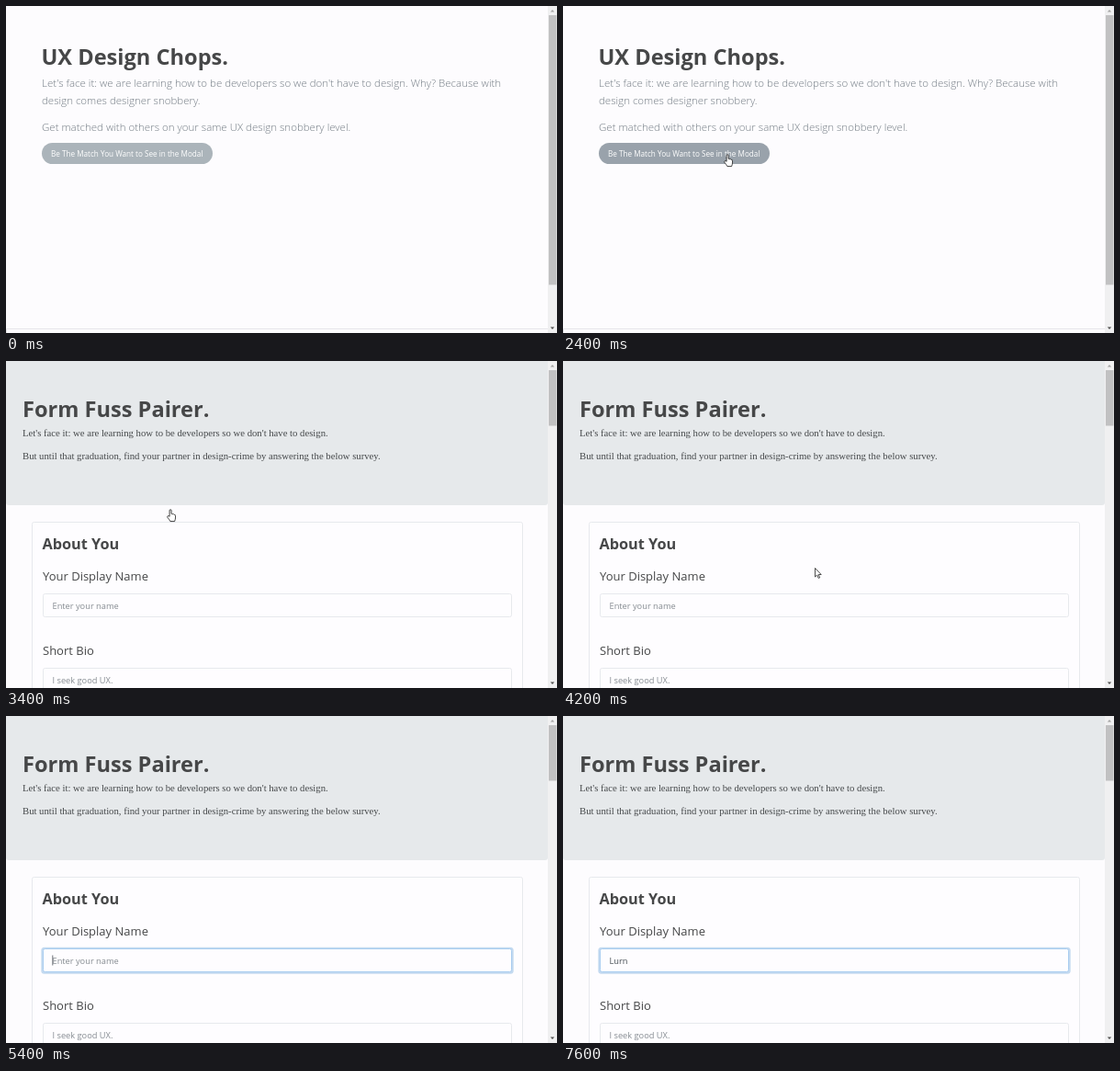
These frames come from a looping animation (600 px wide and 356 px high, 8 s). An HTML page:

```html
<!DOCTYPE html>
<html lang="en">
<head>
<meta charset="utf-8">
<title>Survey walkthrough</title>
<style>
  html, body { margin: 0; width: 100%; height: 100%; overflow: hidden; background: #fdfcfe; }
  svg { display: block; width: 600px; height: 356px; }
  text { font-family: "Open Sans", "Noto Sans", sans-serif; fill: #464748; white-space: pre; }
  .title { font-size: 23.6px; font-weight: 700; }
  .lead { font-size: 11.5px; font-weight: 300; fill: #717a82; }
  .button { font-size: 8.16px; fill: #fff; }
  .intro { font: 10.7px "Liberation Serif", serif; fill: #46494b; }
  .section { font-size: 16.3px; font-weight: 700; }
  .label { font-size: 13px; }
  .field { font-size: 9.25px; fill: #868c92; }
  .typed { fill: #495057; }
  .box { fill: #fefdff; stroke: #e7e9ed; }
</style>
</head>
<body>
<svg viewBox="0 0 600 356">
  <rect width="600" height="356" fill="#fdfcfe"/>

  <g id="landing">
    <path d="M0.5 356V351.5H590" fill="none" stroke="#e6e6ea"/>
    <text class="title" x="38.5" y="64">UX Design Chops.</text>
    <text class="lead" x="39" y="87.5">Let's face it: we are learning how to be developers so we don't have to design. Why? Because with</text>
    <text class="lead" x="39" y="106.5">design comes designer snobbery.</text>
    <text class="lead" x="39" y="135.5">Get matched with others on your same UX design snobbery level.</text>
    <rect id="ring" x="37.8" y="147.8" width="188.4" height="25.4" rx="12.7" fill="#c5cace"/>
    <rect id="button" x="39" y="149" width="186" height="23" rx="11.5"/>
    <text class="button" x="49" y="163.7">Be The Match You Want to See in the Modal</text>
  </g>

  <g id="survey">
    <rect y="-4" width="590" height="161" rx="3" fill="#e6e9eb"/>
    <text class="title" x="18" y="61">Form Fuss Pairer.</text>
    <text class="intro" x="18" y="81.5">Let's face it: we are learning how to be developers so we don't have to design.</text>
    <text class="intro" x="18" y="106.7">But until that graduation, find your partner in design-crime by answering the below survey.</text>
    <rect class="box" x="28.5" y="175.5" width="534" height="200" rx="2"/>
    <text class="section" x="39.5" y="204.5">About You</text>
    <text class="label" x="40" y="239">Your Display Name</text>
    <rect id="glow" x="38.3" y="251.8" width="514.4" height="28.9" rx="3.5" fill="#c4daf0"/>
    <rect id="input" class="box" x="40.5" y="253.5" width="510" height="25" rx="2"/>
    <text id="value" class="field" x="50.5" y="270"></text>
    <path id="caret" stroke="#495057" stroke-width=".8" d="M0 260.5V271.5"/>
    <text class="label" x="40" y="319.5">Short Bio</text>
    <rect class="box" x="40.5" y="334.5" width="510" height="25" rx="2"/>
    <text class="field" x="50.5" y="350.5">I seek good UX.</text>
  </g>

  <g id="scrollbar">
    <rect x="590" width="10" height="356" fill="#f0f0f1"/>
    <rect id="thumb" x="591" y="10" width="8.5" fill="#c1c1c2"/>
    <path d="M592.8 6.5l2.2-2.4 2.2 2.4z" fill="#a5a5a5"/>
    <path d="M592.8 349.5l2.2 2.4 2.2-2.4z" fill="#505050"/>
  </g>

  <path id="hand" transform="translate(175.3 161.3)" fill="#fff" stroke="#222" stroke-width=".85" stroke-linejoin="round"
    d="M2.8 8V1.5Q2.9.4 3.8.4T4.8 1.5V5Q5.9 4.5 6.4 5.5 7.4 5 7.9 6 9.2 5.8 9.2 7.2V9.6Q9.2 11 8.3 13.3H3.6Q2.8 11.6.6 9 .1 7.5 1.2 7.2 2.1 7.3 2.8 8Z"/>
  <path id="arrow" fill="#fff" stroke="#222" stroke-width=".8"
    d="M.5.5V10L2.7 8 4.2 11.4 5.7 10.8 4.2 7.5H7.2Z"/>
</svg>

<script>
const LOOP = 8000;
const SURVEY = 3400;
const FOCUS = 5400;
const NAME = "Lurn";
const TYPING = { start: 6200, step: 200 };

const el = Object.fromEntries(
  [...document.querySelectorAll("[id]")].map(node => [node.id, node]));
const show = (node, on) => node.setAttribute("display", on ? "inline" : "none");
const set = (node, attrs) => {
  for (const key in attrs) node.setAttribute(key, attrs[key]);
};

function drawLanding(t) {
  const fill = t < 1200 ? "#abb4ba" : t < 1400 ? "#a1aab2" : t < 2600 ? "#99a2ab" : "#959eaa";
  set(el.button, { fill });
  show(el.ring, t >= 2600);
}

function drawSurvey(t) {
  const focused = t >= FOCUS;
  const count = t < TYPING.start ? 0
    : Math.min(NAME.length, 1 + Math.floor((t - TYPING.start) / TYPING.step));
  const typed = NAME.slice(0, count);

  el.value.textContent = typed || "Enter your name";
  el.value.classList.toggle("typed", count > 0);
  show(el.glow, focused);
  el.input.style.stroke = focused ? "#a9cdf0" : "";

  show(el.caret, focused && t < 7600);
  const width = count ? el.value.getComputedTextLength() : 0;
  set(el.caret, { transform: `translate(${50.8 + width} 0)` });
}

function drawPointer(t) {
  show(el.hand, t >= 1200 && t < 3600);
  show(el.arrow, t >= 3600 && t < 4800);
  const [x, y] = t < 4400 ? [274, 225] : [166, 216];
  set(el.arrow, { transform: `translate(${x} ${y})` });
}

function render(t) {
  const onSurvey = t >= SURVEY;
  show(el.landing, !onSurvey);
  show(el.survey, onSurvey);
  set(el.thumb, { height: onSurvey ? 60.5 : 293.5 });
  if (onSurvey) drawSurvey(t);
  else drawLanding(t);
  drawPointer(t);
}

const start = performance.now();
function tick() {
  render((performance.now() - start) % LOOP);
  requestAnimationFrame(tick);
}
tick();
</script>
</body>
</html>
```
